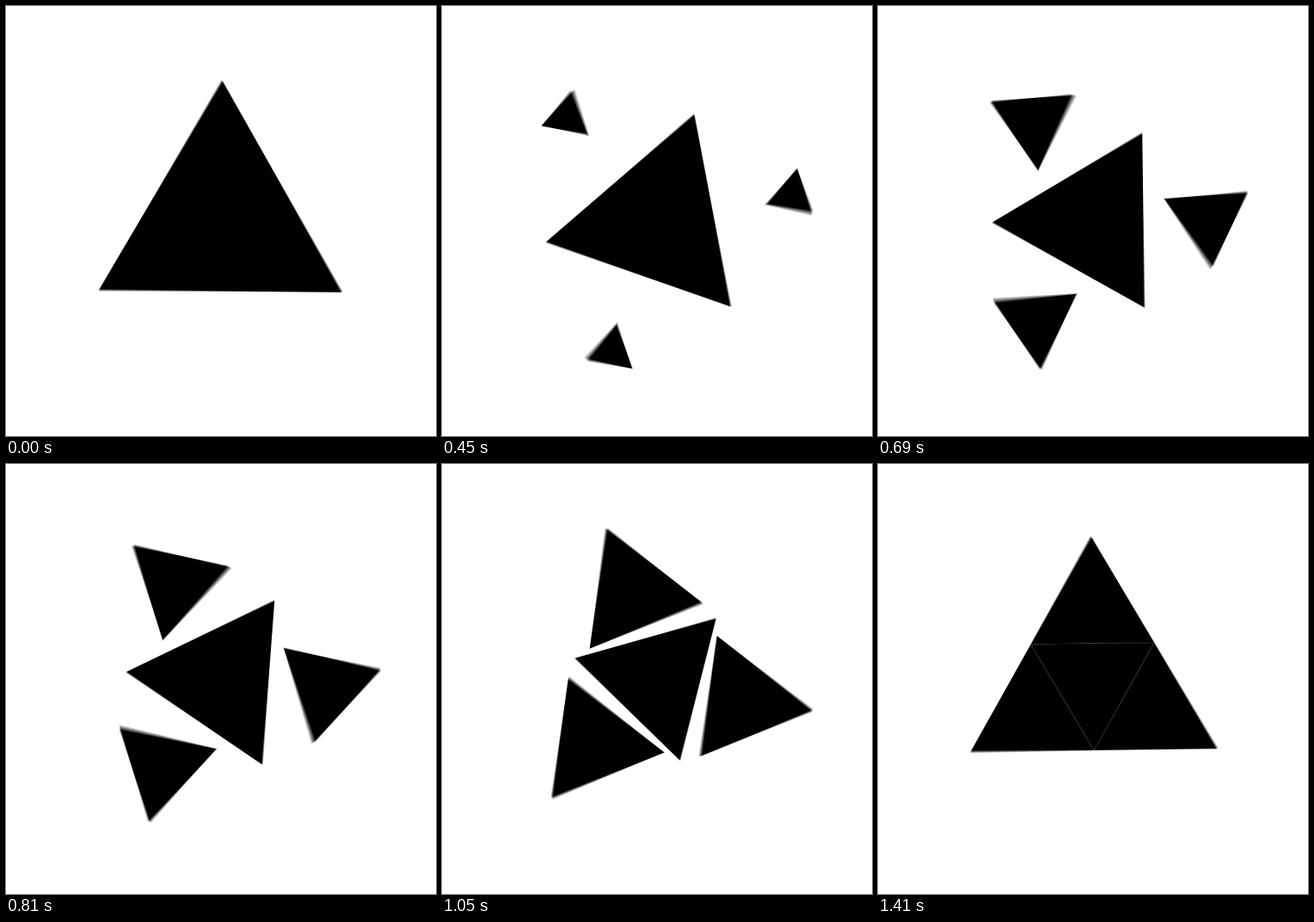
Recreate the animation shown at these times as an HTML page with a canvas. Size 500 by 500 pixels, loop 1440 ms.

```html
<!DOCTYPE html>
<html lang="en">
<head>
<meta charset="utf-8">
<title>Dividing triangle</title>
<style>
  html, body { margin: 0; width: 100%; height: 100%; overflow: hidden; background: #fff; }
  canvas { display: block; width: 500px; height: 500px; }
</style>
</head>
<body>
<canvas id="stage" width="500" height="500"></canvas>
<script>
const SIZE = 500, LOOP = 1440, STEP = 30;
const SHUTTER = 24, SAMPLES = 8;
const RADIUS = 164.3, SPREAD = 63;
const TAU = Math.PI * 2;

const stage = document.getElementById('stage');
const out = stage.getContext('2d');
const layer = document.createElement('canvas');
layer.width = layer.height = SIZE;
const ctx = layer.getContext('2d');

const smooth = p => p * p * (3 - 2 * p);

// Equilateral triangle around the current origin, one corner up.
function triangle(r) {
  ctx.beginPath();
  for (let i = 0; i < 3; i++) {
    const a = i * TAU / 3;
    ctx.lineTo(r * Math.sin(a), -r * Math.cos(a));
  }
  ctx.closePath();
  ctx.fill();
}

function drawScene(ms) {
  const p = ms / LOOP, q = 1 - p;
  const zoom = 2 ** -p;
  ctx.clearRect(0, 0, SIZE, SIZE);
  ctx.save();
  ctx.translate(SIZE / 2, SIZE / 2);
  ctx.rotate(p * TAU / 6);
  ctx.scale(zoom, zoom);
  triangle(RADIUS);

  // Three satellites spin in, grow and settle against the sides.
  for (let i = 0; i < 3; i++) {
    ctx.save();
    ctx.rotate(i * TAU / 3 - TAU / 6);
    ctx.translate(0, -RADIUS - SPREAD * q ** 1.5);
    ctx.rotate(-TAU / 2 * q ** 2.5);
    triangle(RADIUS * smooth(p));
    ctx.restore();
  }
  ctx.restore();
}

// Motion blur: average several moments within the shutter time.
function render(ms) {
  out.clearRect(0, 0, SIZE, SIZE);
  out.globalCompositeOperation = 'lighter';
  out.globalAlpha = 1 / SAMPLES;
  for (let i = 0; i < SAMPLES; i++) {
    drawScene(ms + (i + 0.5) / SAMPLES * SHUTTER);
    out.drawImage(layer, 0, 0);
  }
}

const start = performance.now();
let shown = -1;

function tick() {
  const t = (performance.now() - start) % LOOP;
  const ms = Math.floor(t / STEP) * STEP;
  if (ms !== shown) render(shown = ms);
  requestAnimationFrame(tick);
}
tick();
</script>
</body>
</html>
```
